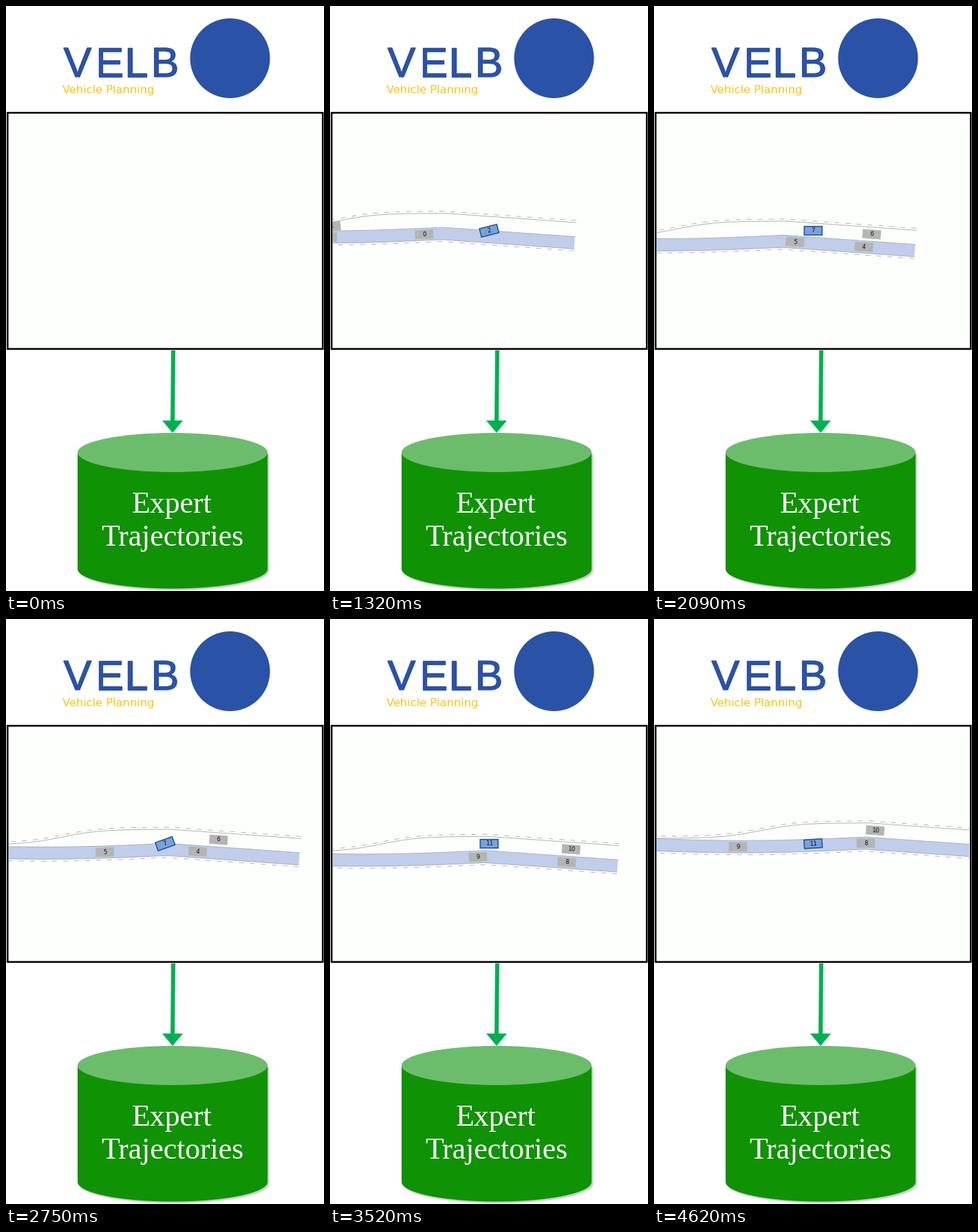
A matplotlib script that plays this animation: 462x851 px, repeating every 4.73 s.

```python
import numpy as np
import matplotlib.pyplot as plt
from matplotlib.animation import FuncAnimation
from matplotlib.patches import Circle, Ellipse, Polygon, Rectangle
from matplotlib.patheffects import withStroke

W, H, DPI = 462, 851, 64
FRAMES, STEP = 43, 110
BLUE, YELLOW, GREEN, GREY = "#2a52a6", "#fdc513", "#00b050", "#b2b4b2"
EGO_X, EGO_Y = 231.2, 326.9
ROAD_END, LANE_WIDTH = 191, 17.8


def px(size):
    """Pixels to points."""
    return size * 72 / DPI


fig = plt.figure(figsize=(W / DPI, H / DPI), dpi=DPI, facecolor="white")
ax = fig.add_axes([0, 0, 1, 1])
ax.set_xlim(0, W)
ax.set_ylim(H, 0)
ax.axis("off")


def label(x, y, text, size, color, font, **kw):
    return ax.text(x, y, text, fontsize=px(size), color=color, family=font, **kw)


def draw_header():
    thick = [withStroke(linewidth=px(1.4), foreground=BLUE)]
    for x, letter in zip((104, 150, 189, 231), "VELB"):
        label(x, 103, letter, 61, BLUE, "Liberation Sans", ha="center",
              va="baseline", path_effects=thick)
    label(82, 127, "Vehicle Planning", 16.3, YELLOW, "DejaVu Sans", va="baseline")
    ax.add_patch(Circle((325.5, 76), 58, fc=BLUE, lw=0))


def draw_store():
    ax.plot([243, 242], [501, 606], color=GREEN, lw=px(6), solid_capstyle="butt")
    ax.add_patch(Polygon([(227, 603), (257, 603), (242, 621)], fc=GREEN, lw=0))
    a = np.linspace(0, np.pi, 80)
    xs = np.r_[380, 242 + 138 * np.cos(a), 104]
    ys = np.r_[649.5, 819 + 28.5 * np.sin(a), 649.5]
    for shift, color in ((3, "#e6e8e6"), (2, "#cacdca"), (0, "#109205")):
        ax.add_patch(Polygon(np.c_[xs + shift, ys + shift], fc=color, lw=0))
    ax.add_patch(Ellipse((242, 649.5), 276, 57, fc="#6bbd6c", lw=0))
    for y, word in ((737, "Expert"), (785, "Trajectories")):
        label(241.5, y, word, 43.7, "white", "Liberation Serif",
              ha="center", va="baseline")


draw_header()
draw_store()
ax.add_patch(Rectangle((2.3, 155.3), 457.9, 343.6, fc="#fdfffc", ec="black",
                       lw=px(2.6), snap=False))
view = Rectangle((4, 157), 454, 340, fc="none", lw=0)
ax.add_patch(view)


# Road shape: height below the crest, dx pixels to its right.
def outer(dx):
    ramp = 22.5 / (1 + np.exp((dx + 155) / 28))
    return np.where(dx > 0, 0.0707 * dx, ramp)


def inner(dx):
    bend = 5.2 * np.sin(np.pi * -dx / 360)
    return 20.5 + np.where(dx > 0, 0.0707 * dx, bend)


def upper_lane(dx):
    return (outer(dx) + inner(dx)) / 2


def lower_lane(dx):
    return inner(dx) + LANE_WIDTH / 2


def tilt(lane, dx):
    """Heading along a lane in degrees, positive when rising to the right."""
    return -np.degrees(np.arctan((lane(dx + 10) - lane(dx - 10)) / 20))


# start: first frame; crest: x and speed; span: frames the merge takes;
# cars: label, lane, x and speed.
SCENES = [
    dict(start=1, ego="2", crest=(91.3, 6.83), span=18.7,
         cars=[("0", lower_lane, 227, -8.2),
               ("1", lower_lane, 130, -12.1),
               ("3", upper_lane, 110, -9.8)]),
    dict(start=16, ego="7", crest=(166.5, 7.85), span=15,
         cars=[("4", lower_lane, 318, -4.4),
               ("5", lower_lane, 235.5, -10.2),
               ("6", upper_lane, 320, -1.25)]),
    dict(start=30, ego="11", crest=(212.8, 8.1), span=14,
         cars=[("8", lower_lane, 351, -3.6),
               ("9", lower_lane, 233.5, -9.3),
               ("10", upper_lane, 356, -2.9)]),
]


def road_line(color, **kw):
    line, = ax.plot([], [], color=color, lw=px(1), dash_capstyle="butt",
                    snap=False, zorder=3, **kw)
    line.set_clip_path(view)
    return line


class Car:
    def __init__(self, fill, edge, width):
        self.body = ax.add_patch(Polygon([(0, 0)] * 4, fc=fill, ec=edge,
                                         lw=px(width), snap=False, zorder=4))
        self.text = label(0, 0, "", 8.6, "#111111", "DejaVu Sans", ha="center",
                          va="center", zorder=5, clip_on=True)
        self.body.set_clip_path(view)
        self.text.set_clip_path(view)
        self.artists = [self.body, self.text]

    def place(self, name, x, y, degrees):
        a = np.radians(degrees)
        c, s = np.cos(a), np.sin(a)
        box = np.array([(-13, -6.3), (13, -6.3), (13, 6.3), (-13, 6.3)])
        self.body.set_xy(box @ np.array([[c, -s], [s, c]]) + (x, y))
        self.text.set_text(name)
        self.text.set_position((x, y))
        self.text.set_rotation(degrees)


DX = np.linspace(ROAD_END, -330, 300)
DASH = (0, (7, 9))
lane_fill = ax.add_patch(Polygon([(0, 0)] * 3, fc="#c0ceeb", lw=0, zorder=2))
lane_fill.set_clip_path(view)
edges = [
    (road_line(GREY), outer(DX), 0),
    (road_line(GREY, ls=DASH), outer(DX) - 3, 0),
    (road_line("#a9b5c9"), inner(DX), -1.5),
    (road_line("#a9b0bb"), inner(DX) + LANE_WIDTH, -3),
    (road_line(GREY, ls=DASH), inner(DX) + LANE_WIDTH + 2.8, -3),
]
greys = [Car("#b3b5b3", "#b3b5b3", 0.6) for _ in range(3)]
ego = Car("#79a1da", "#1d509f", 1.5)
moving = [lane_fill] + [e[0] for e in edges]
moving += [a for car in greys + [ego] for a in car.artists]


def draw_road(cx, cy):
    for line, offset, shift in edges:
        line.set_data(cx + DX + shift, cy + offset)
    top = np.c_[cx + DX - 1.5, cy + inner(DX)]
    bottom = np.c_[cx + DX - 3, cy + inner(DX) + LANE_WIDTH]
    lane_fill.set_xy(np.r_[top, bottom[::-1]])


def draw(frame):
    started = [s for s in SCENES if s["start"] <= frame]
    for artist in moving:
        artist.set_visible(bool(started))
    if not started:
        return moving
    scene = started[-1]
    t = frame - scene["start"]
    x0, speed = scene["crest"]
    cx = x0 + speed * t

    # The view follows the blue car, so its lane change lifts the road.
    u = np.clip((t - 1) / scene["span"], 0, 1)
    merge = u * u * (3 - 2 * u)
    dx = EGO_X - cx
    cy = EGO_Y - (1 - merge) * upper_lane(dx) - merge * lower_lane(dx)
    steer = 19 * (4 * u * (1 - u)) ** 6
    ego.place(scene["ego"], EGO_X, EGO_Y, max(0, steer + tilt(lower_lane, dx)))

    draw_road(cx, cy)
    for car, (name, lane, start_x, v) in zip(greys, scene["cars"]):
        x = start_x + v * t
        car.place(name, x, cy + lane(x - cx), tilt(lane, x - cx))
    return moving


anim = FuncAnimation(fig, draw, frames=FRAMES, interval=STEP,
                     init_func=lambda: draw(0), repeat=True, repeat_delay=0)
plt.show()
```
